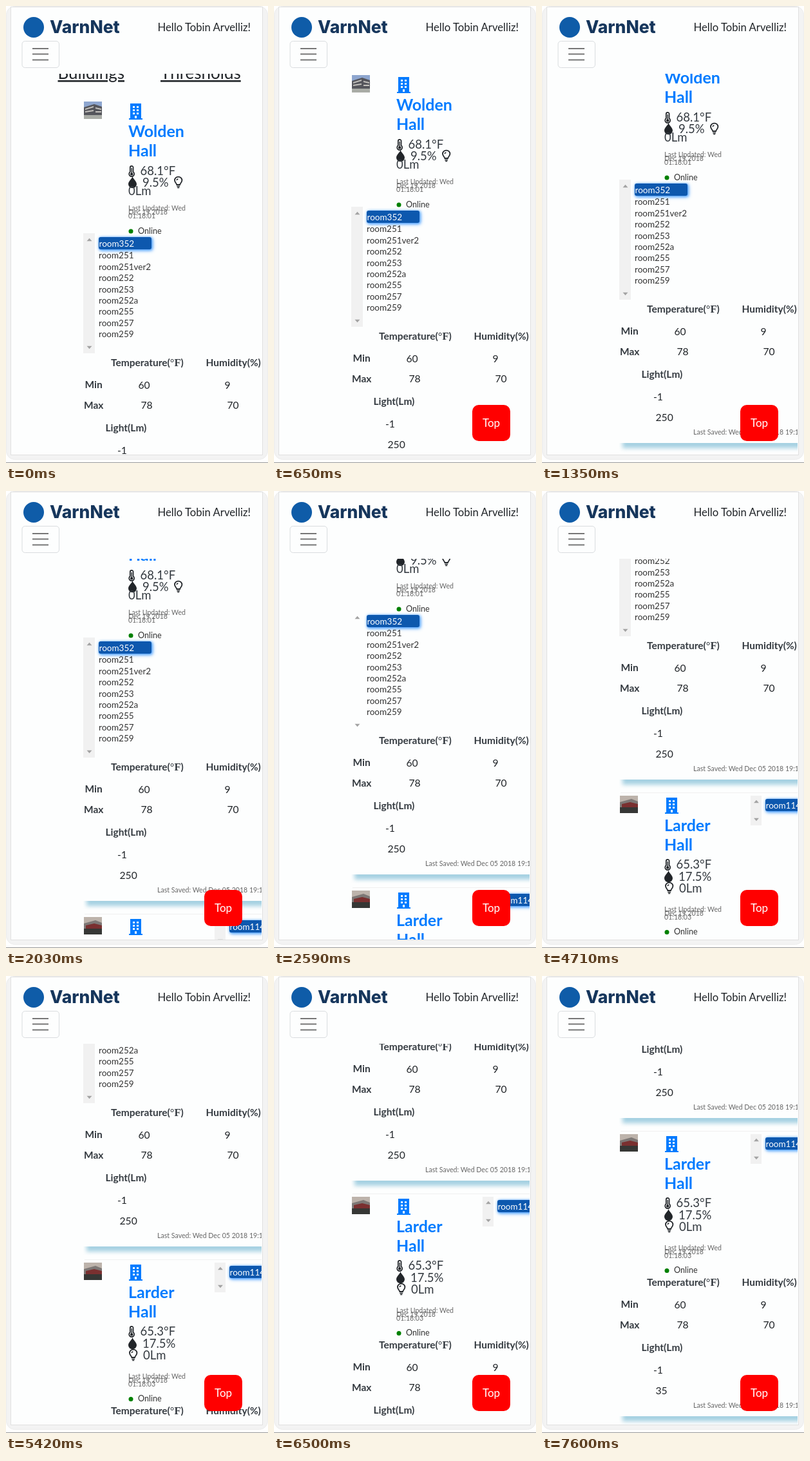
An HTML page that plays this animation: 407x708 px, repeating every 8000 ms.

```html
<!DOCTYPE html>
<html lang="en">
<head>
<meta charset="utf-8">
<title>Room sensors</title>
<style>
  html, body { margin: 0; width: 100%; height: 100%; overflow: hidden; background: #fff; }
  svg { display: block; width: 407px; height: 708px; font-family: Lato, sans-serif; fill: #212529; }

  .brand { font: 800 26.5px Inter, sans-serif; fill: #16365c; }
  .hello { font-size: 16.7px; }
  .tab { font-size: 26px; text-decoration: underline; }
  .title { font-size: 25px; font-weight: 700; fill: #007bff; }
  .reading { font-size: 18.5px; fill: #343a40; }
  .note { font-size: 10.6px; fill: #666; }
  .status { font-size: 12.6px; fill: #333; }
  .option { font-size: 13.5px; fill: #333; }
  .selected { fill: #fff; }
  .value { font-size: 15.7px; }
  .label { font-size: 15.5px; font-weight: 700; fill: #343a40; }
  .degree { font: 700 16.6px "Liberation Serif", serif; }
  .glow { fill: #0d58ae; filter: drop-shadow(1px 1px 2px #4a9dff) drop-shadow(1px 1px 2px #8cc4ff); }
  .shade { fill: #a6d1e2; filter: blur(3px); }
  .track { fill: #f1f1f1; }
  .arrow { fill: #a3a3a3; }
  .blue { color: #007bff; }

  .page, .top, .fading { animation: 8s step-end infinite; }
  .page { animation-name: scroll; }
  .top { animation-name: show-top; }
  .fading { animation-name: hide-track; }

  @keyframes scroll {
    0% { transform: translateY(0); }
    6.25% { transform: translateY(-35px); }
    8.125% { transform: translateY(-41px); }
    15.125% { transform: translateY(-61px); }
    16.875% { transform: translateY(-83px); }
    23.5% { transform: translateY(-111px); }
    25.375% { transform: translateY(-125px); }
    30.75% { transform: translateY(-146px); }
    32.375% { transform: translateY(-166px); }
    36.125% { transform: translateY(-187px); }
    37.625% { transform: translateY(-207px); }
    46.5% { transform: translateY(-249px); }
    53.5% { transform: translateY(-286px); }
    55.375% { transform: translateY(-290px); }
    58.875% { transform: translateY(-313px); }
    60.75% { transform: translateY(-332px); }
    67.75% { transform: translateY(-341px); }
    69.25% { transform: translateY(-373px); }
    74.25% { transform: translateY(-402px); }
    75.875% { transform: translateY(-415px); }
    81.25% { transform: translateY(-443px); }
    83.125% { transform: translateY(-457px); }
    86.625% { transform: translateY(-489px); }
    88.25% { transform: translateY(-498px); }
    93.25% { transform: translateY(-523px); }
    95%, 100% { transform: translateY(-540px); }
  }
  @keyframes show-top { 0% { opacity: 0; } 6.25%, 100% { opacity: 1; } }
  @keyframes hide-track { 0% { opacity: 1; } 32.375% { opacity: 0; } 36.125%, 100% { opacity: 1; } }
</style>
</head>
<body>
<svg viewBox="0 0 407 708">
  <defs>
    <clipPath id="view"><rect x="8" y="105" width="389" height="590"/></clipPath>
    <clipPath id="below"><rect x="120" y="760" width="290" height="14"/></clipPath>

    <g id="building" fill="currentColor">
      <path fill-rule="evenodd" d="M2 0H19V23H21V25H0V23H2ZM6 4v3h3v-3ZM12 4v3h3v-3ZM6 9v3h3v-3ZM12 9v3h3v-3ZM6 14v3h3v-3ZM12 14v3h3v-3ZM9 19v4h3v-4Z"/>
    </g>
    <g id="thermometer">
      <path d="M2.3 10V3.2a2.4 2.4 0 0 1 4.8 0V10a4 4 0 1 1-4.8 0Z" fill="none" stroke="#212529" stroke-width="1.7"/>
      <circle cx="4.7" cy="13.4" r="2.2"/><path d="M4 4h1.4v9H4Z"/>
    </g>
    <path id="drop" d="M6.5 0C7.5 4 13 7.5 13 12a6.5 6.2 0 0 1-13 0C0 7.5 5.5 4 6.5 0Z"/>
    <g id="bulb" fill="none" stroke="#212529" stroke-width="1.8">
      <path d="M4.3 13C4 10.5 1 9.5 1 6a5.7 5.4 0 0 1 11.4 0c0 3.5-3 4.5-3.3 7Z"/>
      <path d="M4.3 15.5h4.8M5.2 17.5h3M4.2 6q.2-1.8 2.2-2" stroke-width="1.5"/>
    </g>
    <path id="up" class="arrow" d="M-4 2.2L0-2.2L4 2.2Z"/>
    <path id="down" class="arrow" d="M-4-2.2L0 2.2L4-2.2Z"/>

    <g id="limits">
      <g class="label">
        <text x="163" y="557.5">Temperature(<tspan class="degree">°F</tspan>)</text>
        <text x="310.5" y="557.5">Humidity(%)</text>
        <text x="122.5" y="592">Min</text>
        <text x="121" y="624">Max</text>
        <text x="154.5" y="659">Light(Lm)</text>
      </g>
      <g class="value">
        <text x="205.5" y="593">60</text><text x="339.5" y="593">9</text>
        <text x="209.5" y="624">78</text><text x="343.5" y="624">70</text>
        <text x="173" y="694">-1</text>
      </g>
      <text class="note" x="235" y="747">Last Saved: Wed Dec 05 2018 19:11</text>
      <g clip-path="url(#below)"><rect class="shade" x="125" y="740" width="300" height="28"/></g>
    </g>
  </defs>

  <!-- window -->
  <rect x=".5" y=".5" width="406" height="702" rx="13" fill="#f3f3f3" stroke="#ececec"/>
  <rect x="7.5" y="1.5" width="391" height="694" fill="#fdfefe" stroke="#e0e0e0"/>
  <path d="M0 707.5H407" stroke="#999"/>

  <!-- header -->
  <circle cx="43" cy="33" r="16" fill="#0f5ca8"/>
  <text class="brand" x="68" y="42">VarnNet</text>
  <text class="hello" x="235.5" y="38.5">Hello Tobin Arvelliz!</text>
  <rect x="25" y="54.5" width="57.5" height="41" rx="4.5" fill="none" stroke="#d9dcdf"/>
  <path d="M41 66H66M41 74.5H66M41 83.5H66" stroke="#777" stroke-width="2"/>

  <g clip-path="url(#view)">
    <g class="page">
      <text class="tab" x="80.5" y="113">Buildings</text>
      <text class="tab" x="240" y="113">Thresholds</text>

      <!-- first hall -->
      <g transform="translate(121 148)">
        <path d="M0 0H28V27H0Z" fill="#8ea6cf"/>
        <path d="M0 9L16 4L28 8V22H0Z" fill="#55565c"/>
        <path d="M2 11L15 7V9L2 13ZM2 15L15 13V15L2 17ZM18 9L27 11V13L18 11ZM18 15H27V17H18Z" fill="#c4c2bd"/>
        <path d="M0 21H28V27H0Z" fill="#a9aca6"/>
      </g>
      <use href="#building" class="blue" x="191" y="151"/>
      <text class="title" x="190" y="203">Wolden</text>
      <text class="title" x="190" y="233">Hall</text>
      <use href="#thermometer" x="190.5" y="247"/>
      <use href="#drop" x="190" y="264"/>
      <use href="#bulb" x="261" y="264"/>
      <g class="reading">
        <text x="208.5" y="262">68.1°F</text>
        <text x="212" y="280">9.5%</text>
        <text x="190" y="293">0Lm</text>
      </g>
      <g class="note">
        <text x="190" y="316.5">Last Updated: Wed</text>
        <text x="190" y="322.5">Dec 19 2018</text>
        <text x="190" y="329">01:18:01</text>
      </g>
      <circle cx="194" cy="349" r="3.5" fill="green"/>
      <text class="status" x="205" y="352.5">Online</text>

      <rect class="track fading" x="120" y="352" width="18" height="186"/>
      <use href="#up" x="129.5" y="362"/>
      <use href="#down" x="129.5" y="529"/>
      <rect class="glow" x="144" y="358" width="82" height="19" rx="3"/>
      <g class="option">
        <text class="selected" x="144.5" y="373">room352</text>
        <text x="144" y="391">room251</text>
        <text x="144" y="409">room251ver2</text>
        <text x="144" y="426">room252</text>
        <text x="144" y="444">room253</text>
        <text x="144" y="461">room252a</text>
        <text x="144" y="478">room255</text>
        <text x="144" y="496">room257</text>
        <text x="144" y="513">room259</text>
      </g>
      <use href="#limits"/>
      <text class="value" x="176.5" y="726">250</text>
      <path d="M122 780.5H397" stroke="#f0f0f0"/>

      <!-- second hall -->
      <g transform="translate(121 785)">
        <path d="M0 0H28V27H0Z" fill="#7d7876"/>
        <path d="M0 0H28V9L18 5L0 10Z" fill="#bdb3ab"/>
        <path d="M3 13L16 10L28 13V18H3Z" fill="#7a3030"/>
        <path d="M0 18H28V27H0Z" fill="#363735"/>
      </g>
      <use href="#building" class="blue" x="191" y="788"/>
      <text class="title" x="190" y="840">Larder</text>
      <text class="title" x="190" y="870">Hall</text>
      <use href="#thermometer" x="190.5" y="883"/>
      <use href="#drop" x="190" y="901"/>
      <use href="#bulb" x="191" y="919"/>
      <g class="reading">
        <text x="208.5" y="898">65.3°F</text>
        <text x="212" y="916.5">17.5%</text>
        <text x="213" y="935">0Lm</text>
      </g>
      <g class="note">
        <text x="190" y="964.5">Last Updated: Wed</text>
        <text x="190" y="970.5">Dec 19 2018</text>
        <text x="190" y="977">01:18:03</text>
      </g>
      <circle cx="194" cy="996.5" r="3.5" fill="green"/>
      <text class="status" x="205" y="1000">Online</text>

      <rect class="track" x="324" y="785" width="17" height="46"/>
      <use href="#up" x="333" y="794"/>
      <use href="#down" x="333" y="822"/>
      <rect class="glow" x="347" y="790" width="82" height="19" rx="3"/>
      <text class="option selected" x="347.5" y="805">room114</text>
      <use href="#limits" y="462"/>
      <text class="value" x="176.5" y="1188">35</text>
    </g>
  </g>

  <g class="top">
    <rect x="308" y="618" width="59" height="56" rx="10" fill="red"/>
    <text x="337.5" y="652" font-size="17" text-anchor="middle" fill="#fff">Top</text>
  </g>
</svg>
</body>
</html>
```
